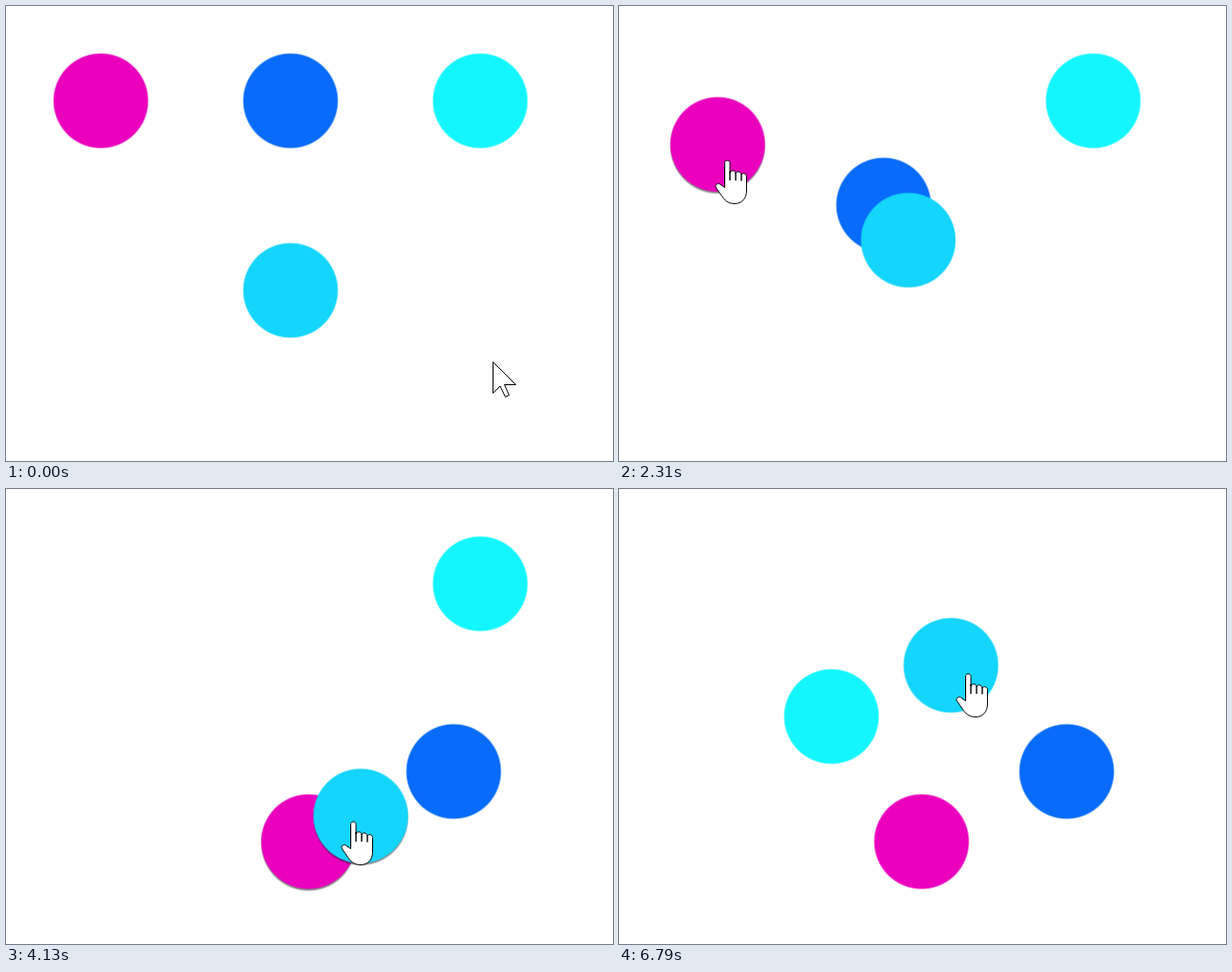
Recreate the animation shown at these times as an HTML page with a canvas. Size 640 by 480 pixels, loop 6860 ms.

```html
<!DOCTYPE html>
<html lang="en">
<head>
<meta charset="utf-8">
<title>Dragging circles</title>
<style>
  html, body { margin: 0; width: 100%; height: 100%; overflow: hidden; background: #fff; }
  canvas { display: block; }
</style>
</head>
<body>
<canvas id="stage" width="640" height="480"></canvas>
<script>
const ctx = document.getElementById('stage').getContext('2d');
const LOOP = 6860, STEP = 70, RADIUS = 50, REST = 80;

const magenta = { x: 100, y: 100, color: '#ea00bd' };
const blue = { x: 300, y: 100, color: '#086bf9' };
const cyan = { x: 500, y: 100, color: '#14f6ff' };
const sky = { x: 300, y: 300, color: '#14d5fb' };
const circles = [magenta, blue, cyan, sky];

// One pointer gesture: where it begins, how far it goes, what it carries.
// bend bows the way sideways, as a share of its length.
const gesture = (time, span, x, y, dx, dy, bend, ...carried) =>
  ({ time, end: time + span, x, y, dx, dy, bend, carried });

const gestures = [
  gesture(0, 0, 513, 375, 0, 0, 0),
  gesture(770, 350, 304, 306, 5, -53, 0, sky),
  gesture(1470, 266, 301, 122, -21, 110, -0.075, blue),
  gesture(2170, 549, 110, 118, 150, 174, 0.43, magenta),
  gesture(2940, 420, 269, 221, 193, 88, 0, blue),
  gesture(3780, 350, 297, 254, 69, 98, 0, magenta, sky),
  gesture(4550, 540, 500, 112, -276, 140, -0.3, cyan),
  gesture(5250, 350, 361, 341, 31, 14, 0),
  gesture(5670, 540, 392, 355, -24, -159, 0, sky)
];

function ease(t, from, to) {
  const u = Math.min(1, Math.max(0, (t - from) / (to - from || 1)));
  return u * u * (3 - 2 * u);
}

// Distance covered by a gesture so far, along a quadratic curve.
function travel({ time, end, dx, dy, bend }, t) {
  const u = ease(t, time, end), side = 2 * u * (1 - u);
  return { x: u * dx - side * bend * dy, y: u * dy + side * bend * dx };
}

function pointer(t) {
  const next = gestures.findIndex(g => g.time > t);
  const g = gestures.at(next < 0 ? -1 : next - 1), way = travel(g, t);
  const p = { x: g.x + way.x, y: g.y + way.y };
  if (next > 0 && t > g.end + REST) {
    const goal = gestures[next], u = ease(t, g.end + REST, goal.time);
    p.x += (goal.x - p.x) * u;
    p.y += (goal.y - p.y) * u;
  }
  return p;
}

function place(circle, t) {
  const spot = { ...circle, held: false };
  for (const g of gestures) {
    if (t < g.time || !g.carried.includes(circle)) continue;
    const way = travel(g, t);
    spot.x += way.x;
    spot.y += way.y;
    spot.held = t <= g.end + REST;
  }
  spot.x = Math.round(spot.x);
  spot.y = Math.round(spot.y);
  return spot;
}

function drawCircle({ x, y, color, held }) {
  const edge = RADIUS + 0.8;
  const soft = ctx.createRadialGradient(x, y, RADIUS - 1, x, y, edge);
  soft.addColorStop(0, color);
  soft.addColorStop(1, color + '00');
  ctx.save();
  if (held) {
    ctx.shadowColor = 'rgba(0,0,0,0.65)';
    ctx.shadowBlur = 9;
    ctx.shadowOffsetY = 2;
  }
  ctx.fillStyle = soft;
  ctx.beginPath();
  ctx.arc(x, y, edge, 0, Math.PI * 2);
  ctx.fill();
  ctx.restore();
}

const arrow = new Path2D('M.5 .5V33.5L8 26L13.5 37.5L17.5 35.5L12.5 24.5H24.5Z');
const hand = new Path2D(
  'M-2.5 1.5C-2.5 -1.8 3 -1.8 3 1.5V12C3.5 9 9 9 9 12.5C9.5 10 15 10.2 15 14' +
  'C15.5 12 20.5 12 20.5 15.5V31C20.5 39 15.5 44.5 8 44.5C1 44.5 -2.5 41 -5.5 36.5' +
  'L-11.5 28C-13.5 25 -10.5 22.5 -7.5 24L-2.5 27.5Z');
const fingers = new Path2D('M3 10V20M9 12V20M15 13V20.5');

function drawPointer({ x, y }, over) {
  const shape = over ? hand : arrow;
  ctx.save();
  ctx.translate(Math.round(x), Math.round(y));
  ctx.fillStyle = '#fff';
  ctx.strokeStyle = '#000';
  ctx.fill(shape);
  ctx.stroke(shape);
  if (over) {
    ctx.lineWidth = 1.4;
    ctx.stroke(fingers);
  }
  ctx.restore();
}

function draw(now) {
  const t = Math.floor((now % LOOP) / STEP) * STEP;
  const spots = circles.map(c => place(c, t)), p = pointer(t);
  ctx.fillStyle = '#fff';
  ctx.fillRect(0, 0, 640, 480);
  spots.forEach(drawCircle);
  drawPointer(p, spots.some(s => Math.hypot(p.x - s.x, p.y - s.y) < RADIUS));
}

let start;
function tick(now) {
  start ??= now;
  draw(now - start);
  requestAnimationFrame(tick);
}
draw(0);
requestAnimationFrame(tick);
</script>
</body>
</html>
```
